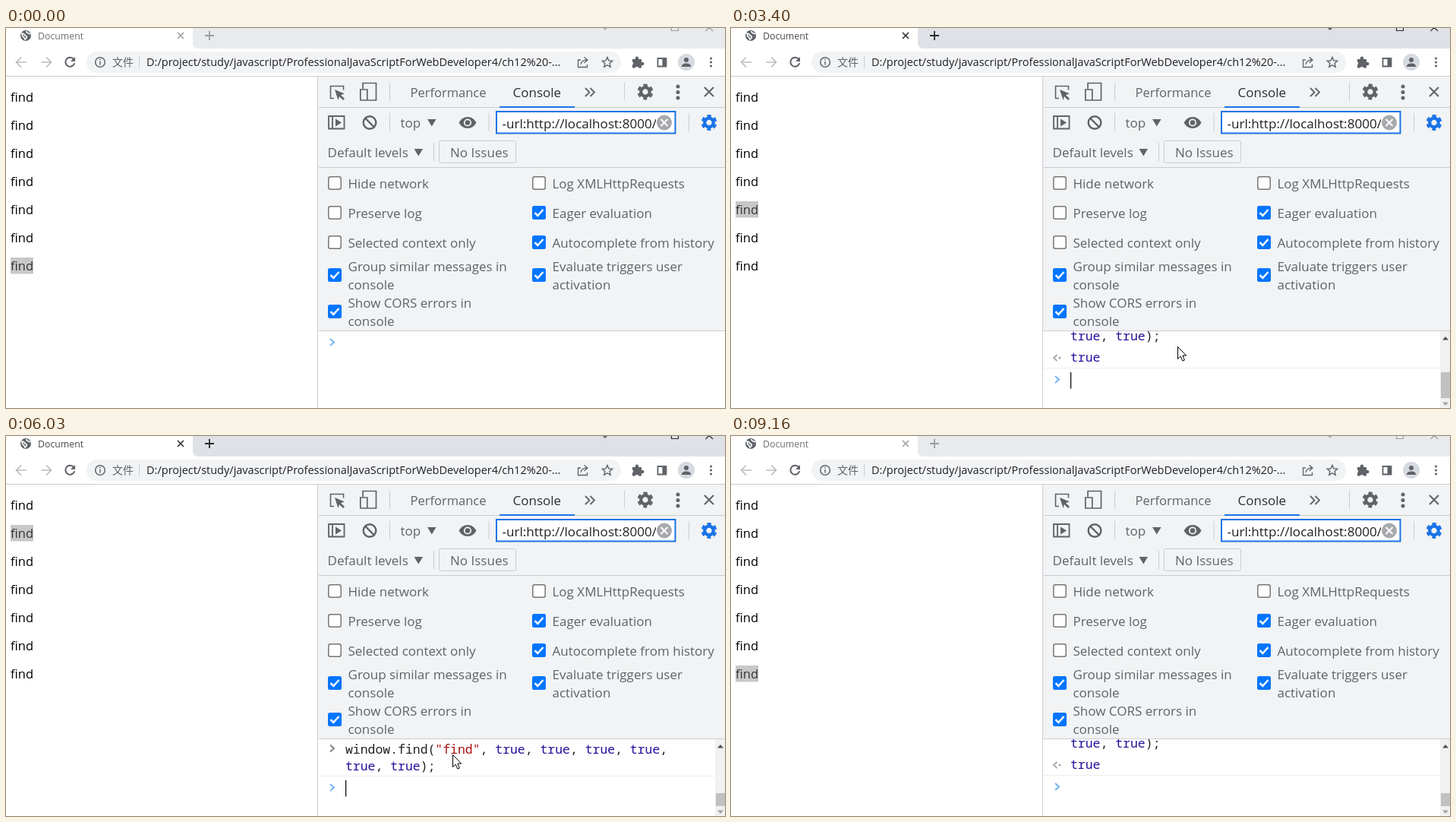
Recreate the animation shown at these times as an HTML page. Size 947 by 500 pixels, loop 9.24 s.

```html
<!DOCTYPE html>
<html lang="en">
<head>
<meta charset="utf-8">
<title>Document</title>
<style>
html, body { margin: 0; width: 100%; height: 100%; overflow: hidden; background: #fff; }
svg { display: block; }
text { font: 17px "Open Sans", "Noto Sans", sans-serif; fill: #5f6368; white-space: pre; }
.mono text { font: 16.45px "Noto Sans Mono", "DejaVu Sans Mono", monospace; fill: #202124; }
.mono .str { fill: #aa1111; }
.mono .atom { fill: #221199; }
.page text { font-size: 16.5px; fill: #000; }
.line { fill: none; stroke: #5f6368; stroke-width: 2; }
.rule { fill: none; stroke: #cacdd1; }
.icon { fill: #5f6368; }
.strip { fill: #dee1e6; }
.tabtext { font-size: 12.3px; fill: #45494d; }
.ctl { fill: none; stroke: #2a2c2e; stroke-width: 1.2; }
.idle .strip { fill: #e8eaed; }
.idle .tabtext { fill: #6b6f73; }
.idle .ctl { stroke: #9a9c9f; }
</style>
</head>
<body>
<svg id="stage" class="idle" width="947" height="500" viewBox="0 0 947 500">
  <defs>
    <g id="off"><rect x=".8" y=".8" width="16.4" height="16.4" rx="2.5" fill="#fff" stroke="#767676" stroke-width="1.5"/></g>
    <g id="on"><rect width="18" height="18" rx="2.5" fill="#0075ff"/><path d="M3.5 9.2l3.8 3.8 7.2-8" fill="none" stroke="#fff" stroke-width="2.5"/></g>
    <g id="gear" fill="none" transform="rotate(90)">
      <circle r="5.8" stroke-width="4.2"/>
      <circle r="8.6" stroke-width="3.8" stroke-dasharray="5 4.006" stroke-dashoffset="2.5"/>
    </g>
    <g id="cmd" class="mono">
      <text x="447">window.find(<tspan class="str">"find"</tspan>, <tspan class="atom">true</tspan>, <tspan class="atom">true</tspan>, <tspan class="atom">true</tspan>, <tspan class="atom">true</tspan>,</text>
      <text x="447" y="21.5"><tspan class="atom">true</tspan>, <tspan class="atom">true</tspan>);</text>
    </g>
    <path id="chevron" d="M427 -4.5l5 4.5-5 4.5" fill="none" stroke-width="2"/>
  </defs>

  <!-- tab strip -->
  <rect class="strip" width="947" height="28"/>
  <path d="M0 0H246V19Q246 27 254 27V28H0z" fill="#fff"/>
  <circle cx="26" cy="10" r="7" class="icon"/>
  <path d="M21 7q3 0 4 3 3 0 2 3l-2 2q-1-3-3-4zM27 4q0 3 3 3l2 1" fill="none" stroke="#fff" stroke-width="1.6"/>
  <text class="tabtext" x="42" y="15">Document</text>
  <path class="ctl" d="M226 6l8 8m0-8l-8 8" style="stroke-width:1.6"/>
  <path class="ctl" d="M262 10h12m-6-6v12" style="stroke-width:1.8"/>
  <path class="ctl" d="M785-2l4 4 4-4M876.5-4v7.5h9V-4M921.5 4l9.5-9.5m-9.5 0l9.5 9.5"/>

  <!-- address bar -->
  <rect y="27" width="947" height="37" fill="#fff"/>
  <path class="rule" d="M0 63.5H947"/>
  <path class="line" d="M27 45H14m6-6.5L13.5 45l6.5 6.5M46 45h13m-6-6.5l6.5 6.5-6.5 6.5" style="stroke:#bbbdc0;stroke-width:1.7"/>
  <path class="line" d="M89.2 41.2a6 6 0 1 0 1 5"/>
  <path class="icon" d="M91 38v6h-6z"/>
  <rect x="106" y="31" width="704" height="28" rx="14" fill="#f1f3f4"/>
  <circle class="line" cx="124" cy="45" r="6.3" style="stroke-width:1.5"/>
  <path class="line" d="M124 44v4.5m0-7.5v1.6" style="stroke-width:1.5"/>
  <text x="140" y="50" style="font:14px 'Noto Sans CJK SC','Noto Sans CJK',sans-serif">文件</text>
  <path class="rule" d="M175.5 37v16"/>
  <text x="185" y="50" style="font-size:14.5px;fill:#202124">D:/project/study/javascript/ProfessionalJavaScriptForWebDeveloper4/ch12%20-...</text>
  <path class="line" d="M757 42h-3.5v9.5h12V48M757 48q1-6 8-6m-3.5-3.5L766 42l-4.5 4" style="stroke-width:1.3"/>
  <path class="line" d="M792 38.5l1.9 4.4 4.8.4-3.6 3.2 1.1 4.7-4.2-2.5-4.2 2.5 1.1-4.7-3.6-3.2 4.8-.4z" style="stroke-width:1.4"/>
  <path class="icon" d="M825 41h4a2.3 2.3 0 1 1 4 0h4v4a2.3 2.3 0 1 1 0 4v3.5h-4a2.2 2.2 0 0 0-4.3 0H825v-4a2.3 2.3 0 0 0 0-4z"/>
  <path class="line" d="M858.5 40h11v10.5h-11z" style="stroke-width:1.8"/>
  <path class="icon" d="M864.5 40h5v10.5h-5z"/>
  <circle cx="896" cy="45" r="11" fill="#d5d9e0"/>
  <circle class="icon" cx="896" cy="42" r="3"/>
  <path class="icon" d="M890 51v-1.5q1.5-3 6-3t6 3V51z"/>
  <g class="icon"><circle cx="928.5" cy="40" r="1.6"/><circle cx="928.5" cy="45" r="1.6"/><circle cx="928.5" cy="50" r="1.6"/></g>

  <!-- page -->
  <g class="page" id="page"><rect id="mark" x="6" width="30" height="21.5" fill="#c8c8c8"/></g>

  <!-- developer tools -->
  <rect x="411" y="64" width="536" height="335" fill="#f1f3f4"/>
  <path class="rule" d="M410.5 64V500M412 104.5H947M412 183.5H947M412 398.5H947"/>
  <path class="rule" d="M505.5 72v24M814.5 72v24M505.5 112v24M636 112v24M899.5 112v24M563.5 151v24"/>

  <path class="line" d="M432 92.5h-4.5V76.5h17v5" style="stroke-width:1.6"/>
  <path class="icon" d="M433 81l13 5.5-5 1.5 5 5-2 2-5-5-1.5 5z"/>
  <path class="line" d="M470 80v-7.5h17.5V95H476M466.8 81h9v14h-9z" style="stroke-width:1.7"/>
  <text x="532.5" y="91" style="font-size:16.5px">Performance</text>
  <text x="667.5" y="91" style="fill:#2b2e31">Console</text>
  <rect x="650" y="103" width="99" height="2" fill="#1a73e8"/>
  <path class="line" d="M763 79l5.5 5.5-5.5 5.5m6.5-11l5.5 5.5-5.5 5.5" style="stroke-width:1.8"/>
  <use href="#gear" x="842" y="84" stroke="#5f6368"/>
  <g class="icon"><circle cx="885" cy="77" r="2.5"/><circle cx="885" cy="84.5" r="2.5"/><circle cx="885" cy="92" r="2.5"/></g>
  <path class="line" d="M920 78l12 12m0-12l-12 12"/>

  <path class="line" d="M425 116h20.5v16.5H425zM430 116v16.5" style="stroke-width:1.8"/>
  <path class="icon" d="M434 119.5l8 5-8 5z"/>
  <circle class="line" cx="479" cy="124.5" r="8.3" style="stroke-width:2.4"/>
  <path class="line" d="M473 118.5l12 12" style="stroke-width:2.4"/>
  <text x="519.5" y="131">top</text>
  <path class="icon" d="M555 120h11.5l-5.7 9.5zM537.5 159H549l-5.7 9.5z"/>
  <path d="M596.5 124.5q4-7.5 11.5-7.5t11.5 7.5q-4 7.5-11.5 7.5t-11.5-7.5z" class="icon"/>
  <circle cx="608" cy="124.5" r="4.2" fill="none" stroke="#f1f3f4" stroke-width="1.8"/>
  <rect x="646" y="110" width="235.5" height="28.5" fill="#fff" stroke="#1a73e8" stroke-width="2"/>
  <text x="653.5" y="131.5" style="font-size:17.1px;fill:#202124">-url:http://localhost:8000/</text>
  <rect x="856" y="112" width="24" height="25" fill="#fff"/>
  <circle cx="867" cy="124.5" r="10" fill="#a7a9ac"/>
  <path d="M862.5 120l9 9m0-9l-9 9" stroke="#fff" stroke-width="2"/>
  <use href="#gear" x="926" y="124.5" stroke="#1a73e8"/>

  <text x="423.5" y="170">Default levels</text>
  <rect x="570.5" y="148.5" width="101" height="29" rx="2" class="rule"/>
  <text x="585" y="170">No Issues</text>
  <g id="options"></g>

  <!-- console -->
  <svg x="412" y="399" width="535" height="101" viewBox="412 399 535 101">
    <rect x="412" y="399" width="535" height="101" fill="#fff"/>
    <g id="log" class="mono">
      <path id="border" d="M412 .5H947" stroke="#eceef0"/>
      <g id="echo"><use href="#cmd"/><use href="#chevron" y="-7" stroke="#808488"/></g>
      <g id="result">
        <text x="447" y="-8"><tspan class="atom">true</tspan></text>
        <path d="M429.5-17l-4.5 4 4.5 4" fill="none" stroke="#a3a6a9" stroke-width="1.7"/>
        <circle cx="433" cy="-13" r="1.5" fill="#a3a6a9"/>
      </g>
      <use id="prompt" href="#chevron" y="15.5"/>
      <use id="typed" href="#cmd" y="23"/>
      <rect id="caret" width="1.2" height="21.5"/>
    </g>
    <g id="bar">
      <rect x="934" y="399" width="13" height="101" fill="#f1f1f1"/>
      <path d="M937 410.5h8l-4-4.5z" fill="#505050"/>
      <path id="down" d="M937 492.5h8l-4 4.5z"/>
      <rect id="thumb" x="935" width="12" fill="#c1c1c1"/>
    </g>
  </svg>

  <path id="arrow" d="M0 0V16l3.7-3.5L6.3 18.5l2.6-1.1L6.4 11.5H11.2z" fill="#fff" stroke="#000"/>
  <path id="beam" d="M587.5 415.5h2l1.5 1 1.5-1h2M591 416v11M587.5 427.5h2l1.5-1 1.5 1h2" fill="none" stroke="#222" stroke-width="1.2"/>
</svg>
<script>
const LOOP = 9240;
const typedAt = [1640, 2710, 4080, 4990, 5650, 6310, 6900];
const foundAt = [2100, 3300, 4490, 5290, 5980, 6590, 7360];
const echoAt = [2100, 3300, 4490, 5330, 6030, 6640, 7360];
const resultAt = [2150, 3400, 4590, 5380, 6080, 6670, 7460];
const caretOff = [[1130, 1640], [3900, 4080], [7960, 8440]];
const home = [588.5, 419.5];

const $ = id => document.getElementById(id);
const count = (list, t) => list.filter(at => at <= t).length;
const set = (el, attrs) => { for (const k in attrs) el.setAttribute(k, attrs[k]); };
const show = (id, on) => { $(id).style.display = on ? '' : 'none'; };

for (let i = 0; i < 7; i++)
  $('page').innerHTML += `<text x="6" y="${97 + 37 * i}">find</text>`;

const option = (x, y, on, ...lines) => {
  const mid = y + 12 * (lines.length - 1);
  $('options').innerHTML += `<use href="#${on ? 'on' : 'off'}" x="${x}" y="${mid - 10}"/>` +
    lines.map((s, i) => `<text x="${x + 26.5}" y="${y + 6 + 24 * i}">${s}</text>`).join('');
};
option(424, 205, 0, 'Hide network');
option(424, 244, 0, 'Preserve log');
option(424, 283, 0, 'Selected context only');
option(424, 314, 1, 'Group similar messages in', 'console');
option(424, 362, 1, 'Show CORS errors in', 'console');
option(693, 205, 0, 'Log XMLHttpRequests');
option(693, 244, 1, 'Eager evaluation');
option(693, 283, 1, 'Autocomplete from history');
option(693, 314, 1, 'Evaluate triggers user', 'activation');

const rows = [...document.querySelectorAll('.page text')];

// The pointer moves in ten visible jumps.
const jump = (t, from, to) => Math.min(10, Math.floor((t - from) / (to - from) * 9) + 1) / 10;
const mix = (a, b, p) => a.map((v, i) => v + (b[i] - v) * p);

function pointer(t) {
  if (t < 70 || t >= 8830) return null;
  if (t < 590) return mix([790, 475], home, 1 - (1 - jump(t, 70, 590)) ** 2);
  if (t < 8420) return home;
  const p = jump(t, 8420, 8830);
  return mix(home, [852, 502], p * p * (3 - 2 * p));
}

function draw(t) {
  const done = count(resultAt, t), echoed = count(echoAt, t);
  const pending = echoed > done;
  const typed = count(typedAt, t) > echoed;
  const active = t >= 590 && t < 9160;
  const base = echoed === 0 ? 398 : done < 5 ? 447 : 446;

  $('stage').classList.toggle('idle', !active);

  const row = (13 - count(foundAt, t)) % 7;
  set($('mark'), { y: 80 + 37 * row });
  rows.forEach((r, i) => { r.style.fill = i === row ? '#323232' : '#000'; });

  set($('log'), { transform: `translate(0 ${base})` });
  show('border', echoed);
  show('echo', echoed);
  set($('echo'), { transform: `translate(0 ${pending ? -29 : -57.5})` });
  show('result', done && !pending);
  set($('prompt'), { stroke: typed ? '#367cf1' : '#78b4f8' });
  show('typed', typed);
  show('caret', active && !caretOff.some(([a, b]) => t >= a && t < b));
  set($('caret'), typed ? { x: 565, y: 28 } : { x: 447, y: 6 });

  const above = 80 * done + 52 * pending;
  const height = above + 53 + 21 * typed;
  const size = Math.max(17, 72 * 101 / height);
  show('bar', echoed);
  if (echoed) {
    set($('thumb'), { y: 415 + (72 - size) * (above - 48) / (height - 101), height: size });
    set($('down'), { fill: typed ? '#505050' : '#a3a3a3' });
  }

  const at = pointer(t), beam = t >= 590 && t < 2100;
  show('beam', beam);
  show('arrow', at && !beam);
  if (at) set($('arrow'), { transform: `translate(${at})` });
}

const start = performance.now();
function tick() {
  draw((performance.now() - start) % LOOP);
  requestAnimationFrame(tick);
}
tick();
</script>
</body>
</html>
```
